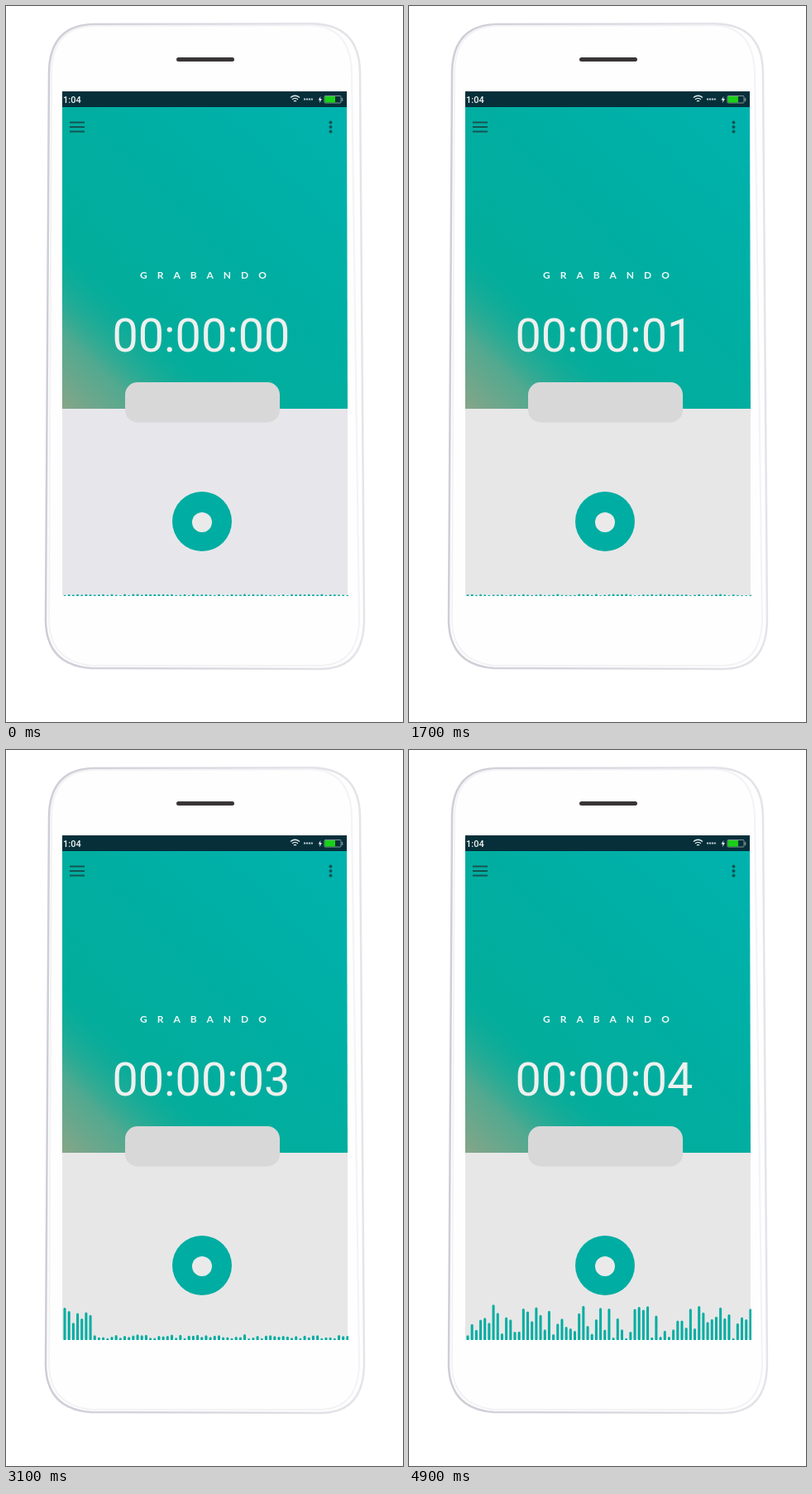
An HTML page that plays this animation: 480 by 864 pixels, repeating every 5000 ms.

```html
<!DOCTYPE html>
<html lang="es">
<head>
<meta charset="utf-8">
<title>Grabadora</title>
<style>
  html, body { margin: 0; width: 100%; height: 100%; overflow: hidden; background: #fff; }
  svg { display: block; width: 480px; height: 864px; }
  .clock { font: 500 11px Roboto, sans-serif; fill: #f2f6f6; }
  .label { font: 700 12px Lato, sans-serif; letter-spacing: 12px; fill: #eefaf8; }
  .timer { font: 400 55.7px Roboto, sans-serif; fill: #eef0ee; }
</style>
</head>
<body>
<svg viewBox="0 0 480 864">
  <defs>
    <linearGradient id="teal" gradientUnits="userSpaceOnUse" x1="110" y1="430" x2="400" y2="140">
      <stop offset="0" stop-color="#04ac98"/>
      <stop offset=".5" stop-color="#00aea1"/>
      <stop offset="1" stop-color="#00b2ad"/>
    </linearGradient>
    <linearGradient id="warm" gradientUnits="userSpaceOnUse" x1="68" y1="486" x2="168" y2="380">
      <stop offset="0" stop-color="#86a588"/>
      <stop offset=".45" stop-color="#56a98f" stop-opacity=".95"/>
      <stop offset="1" stop-color="#14ac98" stop-opacity="0"/>
    </linearGradient>
    <linearGradient id="edge">
      <stop offset="0" stop-color="#cdced6"/>
      <stop offset="1" stop-color="#e4e4ea"/>
    </linearGradient>
    <clipPath id="screen"><rect x="67" y="660" width="347" height="52"/></clipPath>
  </defs>

  <g fill="#fefefe">
    <path stroke="url(#edge)" stroke-width="2.5" d="M52 80Q53 22 108 22L370 21.5Q427 22 428 80L433 742Q432 799 382 800L102 799Q49 795 48 742Z"/>
    <path stroke="#f3f3f6" stroke-width="2" d="M55 80Q56 24 109 24L368 23.5Q416 24 418 80L427 740Q426 795 380 796L104 796Q53 791 52 742Z"/>
  </g>
  <rect x="206" y="62" width="70" height="5" rx="2.5" fill="#393537"/>

  <path fill="url(#teal)" d="M68 103H412L413 486H68Z"/>
  <path fill="url(#warm)" d="M68 122H412L413 486H68Z"/>
  <path fill="#062f3a" d="M68 103H412V122H68Z"/>
  <text class="clock" x="69" y="116.7">1:04</text>
  <g fill="none" stroke="#e4eeee" stroke-width="1.4">
    <path d="M344 110.5Q349.5 106 355 110.5M346 112.8Q349.5 110 353 112.8M348 115Q349.5 113.8 351 115"/>
    <path d="M360 112.5H371" stroke-width="1.8" stroke-dasharray="2.2 .7" opacity=".8"/>
    <rect x="385" y="108.5" width="20" height="8.5" rx="1" stroke="#829496" stroke-width="1"/>
    <path d="M406.5 111V115" stroke="#829496"/>
  </g>
  <path fill="#e4eeee" d="M380.5 109L377.5 113.5H379.5L379 117L382 112H380Z"/>
  <path fill="#19d119" d="M385.5 109H398V116.5H385.5Z"/>

  <path stroke="#135553" stroke-width="2" d="M77 140.5H95M77 146H95M77 151.5H95"/>
  <path stroke="#135553" stroke-width="4" stroke-linecap="round" d="M392.5 140.5h0M392.5 146h0M392.5 151.5h0"/>
  <text class="label" x="162" y="329">GRABANDO</text>
  <text class="timer" id="timer" x="128.5" y="417">00:00:00</text>

  <path id="panel" d="M68 486H413V711H68Z"/>
  <rect x="144" y="454" width="187" height="48.5" rx="15" fill="#d8d8d8"/>
  <circle cx="237" cy="622" r="36" fill="#00ada2"/>
  <circle cx="237" cy="623" r="12" fill="#eaeaea"/>
  <path id="bars" clip-path="url(#screen)" fill="none" stroke="#00ada2" stroke-width="3" stroke-linecap="round"/>
</svg>
<script>
  const timer = document.getElementById('timer');
  const panel = document.getElementById('panel');
  const bars = document.getElementById('bars');

  const LOOP = 5000, STEP = 100;
  const COUNT = 67, PITCH = 5.18, SPEED = 12; // SPEED: bars scrolled per step

  const noise = k => {
    const s = Math.sin(k * 127.1 + 3) * 43758.5453;
    return s - Math.floor(s);
  };

  // Level at place k on the tape: quiet, voice, short pause, voice.
  function level(k) {
    if (k < 271) return 1 + 1.5 * noise(k);
    if (k > 379 && k < 440) return 2 + 5 * noise(k);
    return 2 + 41 * noise(k);
  }

  function draw(now) {
    const step = Math.floor(now % LOOP / STEP);
    timer.textContent = '00:00:0' + Math.floor(step / 10.25);

    // The panel loses its bluish tint over the first steps.
    const blue = 231 + 4 * Math.max(0, 1 - step / 6);
    panel.setAttribute('fill', `rgb(231,231,${blue})`);

    let d = '';
    for (let i = 0; i < COUNT; i++) {
      d += `M${71 + i * PITCH} 714V${713.5 - level(step * SPEED + i)}`;
    }
    bars.setAttribute('d', d);
    requestAnimationFrame(draw);
  }
  requestAnimationFrame(draw);
</script>
</body>
</html>
```
